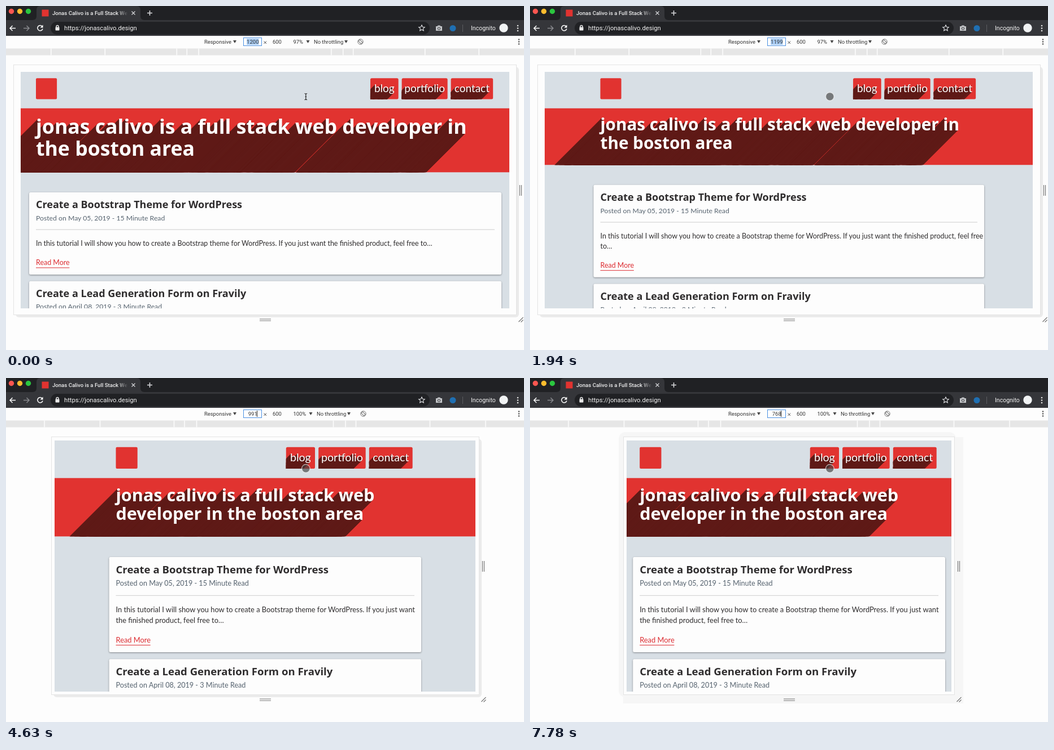
These frames come from a looping animation (917x611 px, 8000 ms). An HTML page:

```html
<!DOCTYPE html>
<html lang="en">
<head>
<meta charset="utf-8">
<title>Responsive layout demo</title>
<style>
html, body { margin: 0; width: 100%; height: 100%; overflow: hidden; background: #fdfdfd; }
svg { display: block; }
#stage { width: 100%; height: 100%; font-family: Roboto, "Liberation Sans", sans-serif; }
.bold { font-family: "Open Sans", sans-serif; font-weight: 700; }
.soft { font-family: Lato, sans-serif; }
.card { fill: #fdfdfd; filter: drop-shadow(0 1px 1.5px #0006); }
.line { fill: none; stroke-width: 1.5; }
</style>
</head>
<body>
<svg id="stage" viewBox="0 0 917 611">
  <defs>
    <linearGradient id="fade"><stop stop-color="#35363a" stop-opacity="0"/><stop offset="1" stop-color="#35363a"/></linearGradient>
  </defs>

  <!-- browser window -->
  <rect width="917" height="53" fill="#202124"/>
  <path d="M47 25Q54 25 54 18V7Q54 0 61 0H231Q238 0 238 7V18Q238 25 245 25H917V53H0V25Z" fill="#35363a"/>
  <circle cx="9.5" cy="9.500" r="4.700" fill="#fc5650"/>
  <circle cx="24.500" cy="9.500" r="4.700" fill="#fdbc2e"/>
  <circle cx="39.500" cy="9.500" r="4.700" fill="#2bc73f"/>
  <rect x="63.500" y="6.500" width="12" height="12" fill="#e13330"/>
  <svg x="82" width="133" height="25"><text y="15.500" font-size="9.6" font-weight="500" fill="#f1f1f1">Jonas Calivo is a Full Stack Web Developer</text></svg>
  <rect x="197" y="5" width="19" height="15" fill="url(#fade)"/>
  <g class="line" stroke="#dcdde0">
    <path d="M222.500 9.500l6 6m0-6l-6 6" stroke-width="1.1"/>
    <path d="M250 12.500h9m-4.500-4.500v9"/>
    <path d="M17 39.500H7m4.500-4.500L7 39.500l4.500 4.500" stroke="#fff"/>
    <path d="M31 39.500h10m-4.500-4.500l4.500 4.500-4.500 4.500" stroke="#88898d"/>
    <path d="M64 36a4.700 4.700 0 1 0 1 4.500" stroke="#fff"/>
  </g>
  <path d="M65.500 33.500v5h-5z" fill="#fff"/>
  <rect x="79" y="28" width="671" height="22.500" rx="11.250" fill="#202124"/>
  <rect x="87.500" y="37.500" width="7" height="6" rx="1" fill="#e8e8e8"/>
  <path d="M89 38v-1.500a2 2 0 0 1 4 0V38" class="line" stroke="#e8e8e8" stroke-width="1.1"/>
  <text x="103" y="43" font-size="11.2" fill="#f4f4f4">https://jonascalivo.design</text>
  <path d="M736 33.800l1.600 3.400 3.700.4-2.800 2.500.8 3.700-3.300-1.900-3.300 1.900.8-3.700-2.800-2.500 3.700-.4z" class="line" style="stroke-width:1.1" stroke="#dcdde0"/>
  <path d="M761 36h2.500l1.200-1.600h3.600l1.200 1.600h2.500v8h-11z" fill="#c3c5c8"/>
  <circle cx="766.500" cy="40" r="2.200" fill="#c3c5c8" stroke="#35363a"/>
  <circle cx="791" cy="39.500" r="5.500" fill="#1f6fb2"/>
  <path d="M808.500 33v13" stroke="#5b5c60"/>
  <text x="823" y="43" font-size="10.5" fill="#f4f4f4">Incognito</text>
  <circle cx="881" cy="39" r="7.700" fill="#f1f3f4"/>
  <g fill="#e8e8e8"><circle cx="906" cy="35" r="1.300"/><circle cx="906" cy="39.500" r="1.300"/><circle cx="906" cy="44" r="1.300"/></g>

  <g id="bar"></g>
  <g id="page"></g>
  <g id="cursor"></g>
</svg>

<script>
const $ = id => document.getElementById(id);
const RED = '#e13330', DARK = '#5f1a17';

const rect = (x, y, w, h, attrs) => `<rect x="${x}" y="${y}" width="${w}" height="${h}" ${attrs}/>`;
const text = (x, y, size, str, attrs = '') => `<text x="${x}" y="${y}" font-size="${size}" ${attrs}>${str}</text>`;
const path = (d, attrs) => `<path d="${d}" ${attrs}/>`;
const clip = (x, y, w, h, body) =>
  `<svg x="${x}" y="${y}" width="${w}" height="${h}" viewBox="${x} ${y} ${w} ${h}">${body}</svg>`;

// white lettering that casts a solid shadow down and to the left
function longShadow(id, length, body) {
  let trail = '';
  for (let i = 1; i <= length; i++) trail += `<use href="#${id}" x="${-i}" y="${i}"/>`;
  return `<g fill="${DARK}">${trail}</g><g fill="#fff"><g id="${id}">${body}</g></g>`;
}

// frame and view: left, top, right, bottom; card: left, right
const small = { zoom: 1, frame: [80, 104, 838, 563], h1: 40, card: [182.5, 735],
  view: [86, 111, 831, 557], head: 'developer', wrap: 'the finished' };
const layouts = {
  xl: { zoom: .97, frame: [13, 104, 904, 549], view: [26, 117, 891, 537], card: [41, 877], h1: 48, head: 'the' },
  lg: { zoom: .97, frame: [13, 104, 904, 549], view: [26, 117, 890, 537], card: [112.5, 804], h1: 40, head: 'the', wrap: 'to…' },
  md: { ...small, view: [92, 117, 825, 551], card: [102, 815], head: 'the', wrap: 'to…' },
  sm: small,
  xs: { ...small, frame: [165, 104, 752, 563], view: [171, 111, 746, 557], card: [182.2, 735], halo: true },
};

const HEADLINE = 'jonas calivo is a full stack web developer in the boston area';
const INTRO = 'In this tutorial I will show you how to create a Bootstrap theme for WordPress. ' +
  'If you just want the finished product, feel free to…';

function breakAt(str, word) {
  const i = word ? str.indexOf(' ' + word) : -1;
  return i < 0 ? [str] : [str.slice(0, i), str.slice(i + 1)];
}

function drawCard(L, u, y, title, posted, lines) {
  const [l, r] = L.card, x = l + 12, extra = 24 * u * (lines.length - 1);
  const readY = y + 174.5 * u + extra;
  return rect(l, y, r - l, 196.7 * u + extra, 'rx="2.5" class="card"') +
    text(x, y + 38 * u, 24.28 * u, title, 'class="bold" fill="#2e2c2d"') +
    text(x, y + 67 * u, 16.5 * u, posted, 'class="soft" fill="#56636f"') +
    rect(x, y + 88.5 * u, r - 12 - x, 1, 'fill="#cdcdcd"') +
    lines.map((s, i) => text(x, y + (128.5 + 24 * i) * u, 16.8 * u, s, 'class="soft" fill="#2e2c2d"')).join('') +
    text(x, readY, 16.8 * u, 'Read More', 'class="soft" fill="#dc2b30"') +
    rect(x, readY + 4, 80 * u, 1, 'fill="#dc2b30"');
}

function drawSite(L) {
  const u = .765 * L.zoom, [l, t, r, b] = L.view, x = L.card[0] + 12, right = L.card[1] - 20 * u;
  const top = t + 15.3 * u, size = 50 * u;
  let out = rect(l, t, r - l, b - t, 'fill="#d8dfe5"') + rect(x, top, size, size, `rx="2" fill="${RED}"`);

  for (const [name, from, to] of [['blog', 292.7, 225.7], ['portfolio', 217.7, 108.5], ['contact', 100.5, 0]]) {
    const bx = right - from * u, w = (from - to) * u;
    const label = text(bx + w / 2, top + 33.5 * u, 25.6 * u, name, 'class="soft" text-anchor="middle"');
    out += rect(bx, top, w, size, `rx="2.5" fill="${RED}"`) + clip(bx, top, w, size, longShadow(name, 45, label));
  }

  const h = L.h1 * u, banner = t + 87.2 * u, height = 2.2 * h + 47.5 * u;
  const lines = breakAt(HEADLINE, L.head).map((s, i) =>
    text(x, banner + 16 * u + (.938 + 1.1 * i) * h, h, s, 'class="bold"')).join('');
  out += rect(l, banner, r - l, height, `fill="${RED}"`) +
    clip(l, banner, r - l, height, longShadow('headline', 105, lines));

  const intro = breakAt(INTRO, L.wrap), y = banner + height + 48 * u;
  const next = y + (212.7 + 24 * (intro.length - 1)) * u;
  out += drawCard(L, u, y, 'Create a Bootstrap Theme for WordPress', 'Posted on May 05, 2019 - 15 Minute Read', intro) +
    drawCard(L, u, next, 'Create a Lead Generation Form on Fravily', 'Posted on April 08, 2019 - 3 Minute Read', ['']);
  return clip(l, t, r - l, b - t, out);
}

function drawPage(L) {
  const [l, t, r, b] = L.frame, midY = (t + b) / 2 + 1, cx = r + 7.5, cy = b + 8;
  const shade = L.halo
    ? rect(l - 8, t - 8, r - l + 10, b - t + 12, 'rx="12" fill="#f6f6f6"') + rect(l, t + 1, r - l + 15, b - t + 14, 'fill="#f6f6f6"')
    : rect(l + 4, t + 4, r - l, b - t, 'rx="6" fill="#ebebeb"');
  const grips = `M${r + 5.5} ${midY - 9.5}v19m3 0v-19M449 ${b + 7}h20m0 3h-20` +
    `M${cx - 4} ${cy + 4}l8-8m0 4.500l-4 4`;
  return shade + rect(l + .5, t + .5, r - l - 1, b - t - 1, 'fill="#fdfdfd" stroke="#e4e4e4"') +
    drawSite(L) + path(grips, 'fill="none" stroke="#777" stroke-width="1.2"');
}

function drawBar(zoom, value, mode) {
  const full = zoom === 1, shift = full ? 5 : 0, half = value.length * 2.67, mid = 436.8;
  const label = (x, s) => text(x, 66.5, 9.4, s, 'fill="#333"');
  const arrow = x => path(`M${x - 3} 61h6l-3 5z`, 'fill="#444"');
  const ticks = [121, 142.5, 161, 292, 390.5].flatMap(d => [458.5 - d * zoom, 458.5 + d * zoom]);
  const icon = 627.5 + shift;
  return rect(0, 53, 917, 21, 'fill="#fdfdfd"') + rect(0, 75.5, 917, 12, 'fill="#e6e6e6"') +
    ticks.map(x => rect(x - .75, 75.5, 1.5, 12, 'fill="#fdfdfd"')).join('') +
    label(351, 'Responsive') + arrow(405) +
    rect(420.5, 56.5, 32, 14, `fill="#fff" stroke="${mode === 'error' ? '#ff1a00' : '#4a90e2'}"`) +
    (mode === 'select' ? rect(mid - half, 58, half * 2, 11, 'fill="#a9cdf5"') : '') +
    text(mid, 66.5, 9.5, value, 'fill="#333" text-anchor="middle"') +
    (mode === 'caret' || mode === 'error' ? rect(Math.floor(mid + half), 58, 1, 11, 'fill="#222"') : '') +
    path('M456.500 62.500l4.500 4.500m0-4.500l-4.500 4.500', 'stroke="#444"') + label(472, '600') +
    label(508.5, full ? '100%' : '97%') + arrow(534.5 + shift) +
    label(545 + shift, 'No throttling') + arrow(602 + shift) +
    `<g fill="none" stroke="#6e6e6e"><circle cx="${icon}" cy="63.500" r="4.700"/>` +
    rect(icon - 1.8, 60, 3.6, 7, `rx=".8" transform="rotate(-45 ${icon} 63.5)"`) + '</g>' +
    [59.5, 63.5, 67.5].map(y => `<circle cx="908" cy="${y}" r="1.300" fill="#555"/>`).join('');
}

const beam = path('M528.500 155.500q2.300 0 2.300 1.500v8q0 1.500-2.300 1.500m4.600-11q-2.300 0-2.300 1.500m0 8q0 1.500 2.300 1.500m-3.600-5.500h2.600',
  'fill="none" stroke="#222" stroke-width="1.1"');
const dot = '<circle cx="530.800" cy="160.800" r="7.300" fill="#404040" fill-opacity=".65" stroke="#fff" stroke-opacity=".6" stroke-width="1.300"/>';

// time, layout, width field, field state
const steps = [
  [0, 'xl', '1200', 'select'],
  [1190, 'lg', '1199', 'caret'], [1640, 'lg', '1199', ''], [1940, 'lg', '1199', 'select'],
  [3140, 'lg', '9', 'error'], [3290, 'lg', '99', 'caret'], [3590, 'lg', '992', 'caret'],
  [4030, 'md', '992', 'caret'], [4480, 'md', '992', ''],
  [4630, 'sm', '991', 'caret'], [5080, 'sm', '991', ''], [5680, 'sm', '991', 'caret'], [5830, 'sm', '991', 'select'],
  [6880, 'sm', '7', 'error'], [7180, 'sm', '76', 'caret'], [7330, 'sm', '768', 'caret'],
  [7780, 'xs', '768', 'caret'],
];

const shown = {};
function show(id, key, draw) {
  if (shown[id] === key) return;
  shown[id] = key;
  $(id).innerHTML = draw();
}

function tick() {
  const t = performance.now() % 8000;
  const step = steps.findLast(s => s[0] <= t), [, name, value, mode] = step;
  show('page', name, () => drawPage(layouts[name]));
  show('bar', step, () => drawBar(layouts[name].zoom, value, mode));
  show('cursor', t < 1040, () => t < 1040 ? beam : dot);
  requestAnimationFrame(tick);
}
tick();
</script>
</body>
</html>
```
